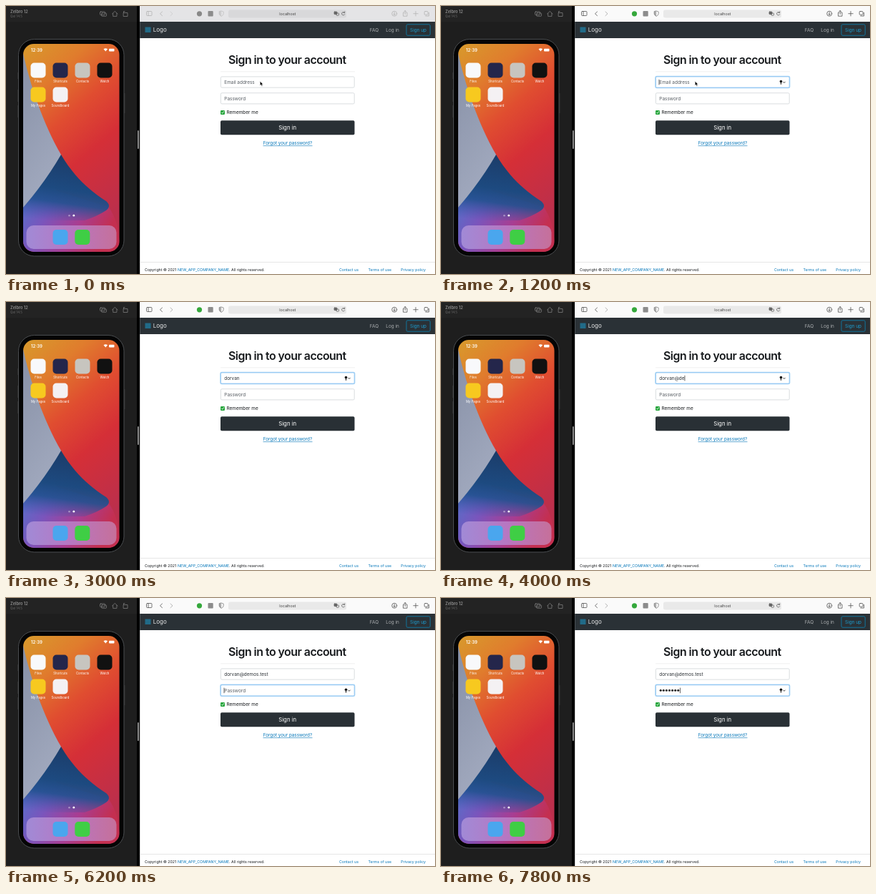
Animation, 600 px wide and 375 px high, one loop 8 s. Source, as an HTML page:

```html
<!DOCTYPE html>
<html lang="en">
<head>
<meta charset="utf-8">
<title>Sign in</title>
<style>
  html, body { margin: 0; width: 100%; height: 100%; overflow: hidden; background: #000; }
  svg { display: block; width: 100vw; height: 100vh; }
  text { font-family: Inter, Roboto, sans-serif; font-size: 6.45px; fill: #16191c; white-space: pre; }
  .mid { text-anchor: middle; }
  .link { fill: #0275b8; }
  .foot text { font-size: 5.28px; }
  .label { font-size: 4.3px; fill: #fff; text-anchor: middle; }
  .line { fill: none; stroke: currentColor; stroke-width: .8; stroke-linecap: round; stroke-linejoin: round; }
  .box { fill: #fff; stroke: #d0d5d9; stroke-width: .8; }
  .focus .box { stroke: #80bdf0; }
  .glow { fill: #aed7f6; visibility: hidden; }
  .key { visibility: hidden; color: #111; }
  .focus .glow, .focus .key { visibility: visible; }
  #toolbar { color: #555; }
  #toolbar.idle { color: #b4b4b4; }
  .bar { fill: #fafafa; }
  .idle .bar { fill: #e4e4e6; }
  .address { fill: #e9e9e9; }
  .idle .address { fill: #d8d8da; }
  .idle .green { fill: #888; }
</style>
</head>
<body>
<svg viewBox="0 0 600 375" preserveAspectRatio="none">
  <defs>
    <linearGradient id="warm" x1=".1" y1="0" x2=".5" y2="1">
      <stop offset="0" stop-color="#d9962c"/><stop offset=".2" stop-color="#e07c2d"/>
      <stop offset=".42" stop-color="#e04d30"/><stop offset=".65" stop-color="#d52f37"/>
      <stop offset="1" stop-color="#bb2f4c"/>
    </linearGradient>
    <linearGradient id="mist" x1="0" y1="0" x2=".3" y2="1">
      <stop offset="0" stop-color="#8790a6"/><stop offset="1" stop-color="#a3abc0"/>
    </linearGradient>
    <linearGradient id="navy" gradientUnits="userSpaceOnUse" x1="78" y1="208" x2="64" y2="302">
      <stop offset="0" stop-color="#1b3c69"/><stop offset=".5" stop-color="#1d4a80"/>
      <stop offset=".7" stop-color="#21518f" stop-opacity=".9"/>
      <stop offset="1" stop-color="#3a55a8" stop-opacity="0"/>
    </linearGradient>
    <linearGradient id="violet" x1="0" y1="0" x2="1" y2=".35">
      <stop offset="0" stop-color="#4f74cc"/><stop offset=".35" stop-color="#7a55bc"/>
      <stop offset=".68" stop-color="#a83d92"/><stop offset="1" stop-color="#c42f50"/>
    </linearGradient>
    <linearGradient id="dock">
      <stop offset="0" stop-color="#a18ad6"/><stop offset=".5" stop-color="#b777c2"/>
      <stop offset="1" stop-color="#c6709a"/>
    </linearGradient>
    <clipPath id="screen"><rect x="24" y="53" width="134.5" height="291" rx="15"/></clipPath>
  </defs>

  <!-- Simulator -->
  <rect width="183" height="375" fill="#1e1e1e"/>
  <rect width="183" height="22" fill="#232323"/>
  <text x="6" y="10" style="font-size:5.6px;font-weight:600;fill:#8f8f8f">Zelbro 12</text>
  <text x="6" y="16.2" style="font-size:4.5px;fill:#6a6a6a">Qel 14.5</text>
  <g class="line" color="#7c7c7c">
    <rect x="131.5" y="8" width="7" height="4.5" rx="1"/><rect x="133.5" y="9.8" width="7" height="4.5" rx="1"/>
    <path d="M148.5 11l3.8-3.6 3.8 3.6M149.7 10.4v4h5.2v-4"/>
    <path d="M164.5 9.5h5.5v5h-5.5zM166 7.5h-1.5v2"/>
  </g>
  <path d="M16.8 93v9M16.8 117v17M16.8 139v17M165.8 122v28" stroke="#333" stroke-width="1.4"/>
  <rect x="17.5" y="46.5" width="147.5" height="303.5" rx="22" fill="#050505" stroke="#4a4d50"/>
  <g clip-path="url(#screen)">
    <path d="M24 53h135v291H24z" fill="url(#warm)"/>
    <path d="M24 66C33 108 52 165 77 208L70 260 24 300z" fill="url(#mist)"/>
    <path d="M24 282L50 252 143 281Q159 300 159 344H24z" fill="url(#violet)"/>
    <path d="M24 282Q55 246 77 208C97 242 120 260 140 273Q148 280 140 286Q128 294 110 300H24z" fill="url(#navy)"/>
  </g>
  <text x="35" y="64" style="font-size:6px;font-weight:600;fill:#fff">12:39</text>
  <path d="M136.5 60.2q2.8-2 5.6 0l-2.8 3.2z" fill="#fff"/>
  <rect x="144" y="59.7" width="7.5" height="3.8" rx="1" fill="#fff"/>
  <g id="apps"></g>
  <circle cx="88.5" cy="293.2" r="1.3" fill="#fff" opacity=".4"/>
  <circle cx="94.8" cy="293.2" r="1.4" fill="#fff"/>
  <rect x="28.5" y="307" width="126" height="33" rx="10" fill="url(#dock)"/>
  <rect x="65.5" y="313" width="21" height="21" rx="5" fill="#4aa6ee"/>
  <rect x="96.3" y="313" width="21" height="21" rx="5" fill="#3fce45"/>
  <rect x="184" y="174" width="1.8" height="26" rx=".9" fill="#a0a0a0"/>

  <!-- Browser -->
  <rect x="187.2" width="413" height="375" fill="#fff"/>
  <g id="toolbar">
    <rect class="bar" x="187.2" width="413" height="22"/>
    <rect class="address" x="311" y="5.5" width="165" height="11" rx="2.5"/>
    <g class="line">
      <rect x="196.5" y="7.5" width="7.5" height="6" rx="1"/><path d="M199 7.5v6"/>
      <path d="M218.5 8l-3 2.8 3 2.8"/><path d="M230 8l3 2.8-3 2.8" opacity=".5"/>
      <path d="M301.2 7l3 1v3q-.3 2-3 3.4q-2.7-1.4-3-3.4v-3z" opacity=".7"/>
      <circle cx="543.2" cy="10.7" r="3.5"/><path d="M543.2 8.7v3.8m-1.5-1.4l1.5 1.5 1.5-1.5"/>
      <path d="M556.8 9.2h-1.3v5h5.5v-5h-1.3M558.2 11.5v-5m-1.6 1.5l1.6-1.6 1.6 1.6"/>
      <path d="M569.8 10.7h6.4m-3.2-3.2v6.4"/>
      <rect x="585.2" y="7.5" width="4.8" height="4.8" rx="1"/><path d="M591.5 9.3v4.7h-4.7"/>
    </g>
    <path d="M301.2 7v7.4q-2.7-1.4-3-3.4v-3z" fill="currentColor" opacity=".45"/>
    <circle class="green" cx="270.5" cy="10.8" r="3.6" fill="#35a83c"/>
    <rect x="282.5" y="7" width="7.2" height="7.6" rx="1" fill="#8c8c8c"/>
  </g>
  <text class="mid" x="393.8" y="13" style="font-size:5.4px;fill:#444">localhost</text>
  <g class="line" color="#666">
    <rect x="459" y="8" width="4" height="3.6" rx=".7" fill="#666"/><rect x="462" y="10" width="3.5" height="3.2" rx=".7"/>
    <path d="M473.5 9.3a2.2 2.2 0 1 0 .3 2.3M473.7 7.8v1.7h-1.7"/>
  </g>

  <rect x="187.2" y="22" width="413" height="23" fill="#2a3136"/>
  <rect x="194.5" y="29.5" width="8" height="7.5" fill="#216b88"/>
  <text x="205.8" y="36.3" style="font-size:8px;fill:#e4e5e6">Logo</text>
  <text x="508.8" y="36" style="fill:#a9acae">FAQ</text>
  <text x="531.3" y="36" style="fill:#a9acae">Log in</text>
  <rect x="560" y="25.8" width="33.2" height="15.4" rx="1.8" fill="none" stroke="#0b86b6" stroke-width=".8"/>
  <text class="mid" x="576.5" y="36" style="fill:#1b9fd2">Sign up</text>

  <text class="mid" x="393.3" y="81.3" style="font-size:15.9px;font-weight:600;letter-spacing:-.032em">Sign in to your account</text>
  <path d="M300 91.8h188" stroke="#eee" stroke-width=".8"/>
  <g id="email"></g>
  <g id="password"></g>
  <rect x="300" y="146" width="6" height="6" rx="1.3" fill="#25a53b"/>
  <path class="line" d="M301.5 149l1.2 1.3 1.9-2.8" color="#fff"/>
  <text x="308.5" y="151.2">Remember me</text>
  <rect x="300" y="160.3" width="187.5" height="20" rx="1.8" fill="#293035"/>
  <text class="mid" x="393.7" y="173.3" style="font-size:7.8px;fill:#fff">Sign in</text>
  <text class="mid link" x="394" y="194.3" style="font-size:6.3px">Forgot your password?</text>
  <path d="M359.5 195.6h69" stroke="#0275b8" stroke-width=".6"/>

  <path d="M187.2 358.5h413" stroke="#e1e1e1" stroke-width=".8"/>
  <g class="foot">
    <text x="194" y="371.3">Copyright © 2021</text>
    <text class="link" x="240" y="371.3">NEW_APP_COMPANY_NAME</text>
    <text x="312" y="371.3">. All rights reserved.</text>
    <text class="link" x="466" y="371.3">Contact us</text>
    <text class="link" x="506.5" y="371.3">Terms of use</text>
    <text class="link" x="552.3" y="371.3">Privacy policy</text>
  </g>
  <path id="pointer" d="M355.3 105.3v6l1.4-1.2 1 2.2 1.1-.5-1-2.1h1.9z" fill="#000" stroke="#fff" stroke-width=".5"/>
</svg>
<script>
const LOOP = 8000, FOCUS = 600, TAB = 6000;
const ADDRESS = "dorvan@demos.test";
const addressKeys = [1600, 1800, 2000, 2200, 2400, 2500, 3200, 3600, 3800,
  4200, 4400, 4600, 4900, 5200, 5300, 5450, 5600];
const passwordKeys = Array.from({ length: 7 }, (_, i) => 6500 + i * 200);
const byId = id => document.getElementById(id);

const apps = [["Files", "#f8f9fb"], ["Shortcuts", "#24264b"], ["Contacts", "#c7c5bf"],
  ["Watch", "#111"], ["My Pages", "#f7c91f"], ["Soundboard", "#f4f1f3"]];
byId("apps").innerHTML = apps.map(([name, color], i) => {
  const x = 45 + i % 4 * 31, y = 90 + (i >> 2) * 34;
  return `<rect x="${x - 10.5}" y="${y - 10.5}" width="21" height="21" rx="5" fill="${color}"/>
    <text class="label" x="${x}" y="${y + 16.6}">${name}</text>`;
}).join("");

function makeField(id, top, placeholder) {
  const root = byId(id);
  root.innerHTML = `
    <rect class="glow" x="299.2" y="${top - .8}" width="189.2" height="17.6" rx="2.4"/>
    <rect class="box" x="300.4" y="${top + .4}" width="186.8" height="15.2" rx="1.6"/>
    <text x="305.3" y="${top + 10.6}"></text>
    <g class="dots"></g>
    <path class="caret" d="M0 ${top + 4.3}v7.6" stroke="#222" stroke-width=".7"/>
    <g class="key"><circle cx="475.5" cy="${top + 7}" r="1.8" fill="#111"/>
      <path d="M475.5 ${top + 8}v3.2" stroke="#111" stroke-width="1.1"/>
      <path class="line" d="M478.7 ${top + 7.7}l1.3 1.3 1.3-1.3"/></g>`;
  const text = root.querySelector("text");
  const dots = root.querySelector(".dots");
  const caret = root.querySelector(".caret");

  return ({ value, masked, focused, idleFor }) => {
    const count = value.length;
    root.classList.toggle("focus", focused);
    text.textContent = count ? (masked ? "" : value) : placeholder;
    text.style.fill = count ? "#2c3136" : "#565c62";
    dots.innerHTML = masked ? [...value].map((_, i) =>
      `<circle cx="${307.2 + i * 4.1}" cy="${top + 8}" r="1.5" fill="#222"/>`).join("") : "";
    const end = !count ? 305 : masked ? 305.8 + count * 4.1 : 305.7 + text.getComputedTextLength();
    caret.setAttribute("transform", `translate(${end})`);
    caret.style.visibility = focused && idleFor % 1000 < 500 ? "visible" : "hidden";
  };
}

const drawEmail = makeField("email", 98.5, "Email address");
const drawPassword = makeField("password", 121.3, "Password");

// The caret blinks from the moment of focus and restarts with every key.
function typing(keys, start, time) {
  const pressed = keys.filter(key => key <= time);
  return { count: pressed.length, idleFor: time - (pressed.at(-1) ?? start) };
}

function draw(time) {
  const email = typing(addressKeys, FOCUS - 500, time);
  const password = typing(passwordKeys, TAB, time);
  byId("toolbar").classList.toggle("idle", time < FOCUS);
  byId("pointer").style.visibility = email.count ? "hidden" : "visible";
  drawEmail({ value: ADDRESS.slice(0, email.count), masked: false,
    focused: time >= FOCUS && time < TAB, idleFor: email.idleFor });
  drawPassword({ value: "*".repeat(password.count), masked: true,
    focused: time >= TAB, idleFor: password.idleFor });
}

function tick() {
  draw(performance.now() % LOOP);
  requestAnimationFrame(tick);
}
tick();
</script>
</body>
</html>
```
